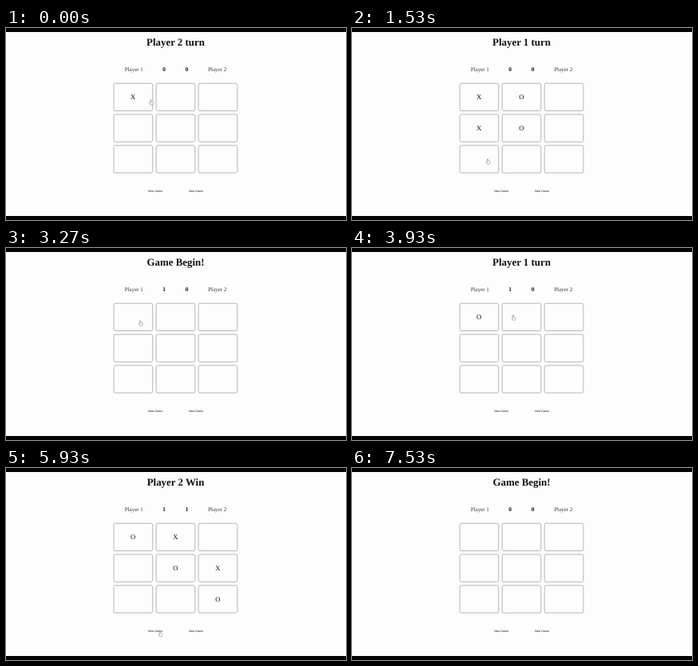
An HTML page that plays this animation: 426 px wide and 240 px high, repeating every 7.59 s.

```html
<!DOCTYPE html>
<html lang="en">
<head>
<meta charset="utf-8">
<title>Tic-tac-toe</title>
<style>
  html, body { margin: 0; width: 100%; height: 100%; overflow: hidden; background: #000; }
  svg { display: block; width: 100vw; height: 100vh; }
  text {
    font-family: "Liberation Serif", "Times New Roman", serif;
    text-anchor: middle;
    text-rendering: geometricPrecision;
    fill: #111;
  }
  .title { font-size: 12.9px; font-weight: bold; }
  .name { font-size: 7px; fill: #333; }
  .score { font-size: 7.4px; font-weight: bold; }
  .mark { font-size: 8.6px; }
  .button { font-family: "Liberation Sans", Arial, sans-serif; font-size: 3.6px; }
  .cell { fill: #fdfdfd; stroke: #b6b6bc; stroke-width: 1; }
  .hand { fill: #fff; stroke: #85858c; stroke-width: .6; stroke-linejoin: round; }
</style>
</head>
<body>
<svg id="stage" viewBox="0 0 426 240" preserveAspectRatio="none"></svg>
<script>
const LOOP = 7590;
const STEP = 1000 / 15;

// time, title, score 1, score 2, board row by row
const STATES = [
  [0,    'Player 2 turn', 0, 0, 'X........'],
  [400,  'Player 1 turn', 0, 0, 'XO.......'],
  [870,  'Player 2 turn', 0, 0, 'XO.X.....'],
  [1270, 'Player 1 turn', 0, 0, 'XO.XO....'],
  [1670, 'Player 1 Win',  1, 0, 'XO.XO.X..'],
  [2600, 'Game Begin!',   1, 0, '.........'],
  [3470, 'Player 1 turn', 1, 0, 'O........'],
  [4070, 'Player 2 turn', 1, 0, 'OX.......'],
  [4470, 'Player 1 turn', 1, 0, 'OX..O....'],
  [4870, 'Player 2 turn', 1, 0, 'OX..OX...'],
  [5400, 'Player 2 Win',  1, 1, 'OX..OX..O'],
  [6130, 'Game Begin!',   0, 0, '.........']
];

// time, x, y of the fingertip
const PATH = [
  [0, 181.5, 89.5], [330, 206, 89], [470, 206, 89],
  [800, 168, 127], [930, 168, 127],
  [1200, 205, 128], [1330, 205, 128],
  [1530, 170, 163.5], [1730, 170, 164],
  [2400, 238, 201.5], [2730, 238, 201.5],
  [3330, 166, 87], [3530, 166, 87],
  [3870, 202, 83.5], [4130, 202, 84],
  [4400, 209, 127], [4530, 209, 127],
  [4800, 261, 124.5], [4960, 261, 124.5],
  [5330, 262, 165], [5500, 262, 165],
  [5900, 193, 204], [6270, 193, 204],
  [6870, 193, 204]
];
const CURSOR_END = 6870;

const stage = document.getElementById('stage');

function add(tag, attrs, label = '') {
  const node = document.createElementNS('http://www.w3.org/2000/svg', tag);
  for (const key in attrs) node.setAttribute(key, attrs[key]);
  node.textContent = label;
  stage.append(node);
  return node;
}

const label = (kind, x, y, words) => add('text', { class: kind, x, y }, words);

add('rect', { y: 5, width: 426, height: 230, fill: '#fdfdfd' });
const title = label('title', 212.5, 21.7);
label('name', 160.3, 54.2, 'Player 1');
label('name', 264.7, 54.2, 'Player 2');
const scores = [198.2, 226.5].map(x => label('score', x, 54.2));
label('button', 187, 205.4, 'New Game');
label('button', 238, 205.4, 'Next Game');

const marks = Array.from({ length: 9 }, (_, i) => {
  const x = 135 + (i % 3) * 53.1;
  const y = 69.2 + Math.floor(i / 3) * 38.8;
  add('rect', { class: 'cell', x, y, width: 48.7, height: 34.3, rx: 2 });
  return label('mark', x + 24.2, y + 20);
});

const cursor = add('path', {
  class: 'hand',
  d: 'M-.5 .3Q0-.4 .5 .3V2.4L2.6 3Q3.3 3.3 3.1 4.3L2.5 6.6H-.5L-2 4.2Q-2 3.3-.5 4.1Z'
});

function pointAt(t) {
  const next = PATH.findIndex(p => p[0] > t);
  if (next < 0) return PATH[PATH.length - 1].slice(1);
  const [t0, x0, y0] = PATH[next - 1];
  const [t1, x1, y1] = PATH[next];
  const u = (t - t0) / (t1 - t0);
  const k = u * u * (3 - 2 * u);
  return [x0 + (x1 - x0) * k, y0 + (y1 - y0) * k];
}

function draw(t) {
  const [, words, one, two, board] = STATES.filter(s => s[0] <= t + 4).pop();
  title.textContent = words;
  scores[0].textContent = one;
  scores[1].textContent = two;
  marks.forEach((mark, i) => {
    mark.textContent = board[i] === '.' ? '' : board[i];
  });
  const [x, y] = pointAt(t);
  cursor.setAttribute('transform', `translate(${x} ${y})`);
  cursor.setAttribute('visibility', t < CURSOR_END ? 'visible' : 'hidden');
}

const start = performance.now();
function tick() {
  const t = (performance.now() - start) % LOOP;
  draw(Math.floor((t + 4) / STEP) * STEP);
  requestAnimationFrame(tick);
}
draw(0);
requestAnimationFrame(tick);
</script>
</body>
</html>
```
